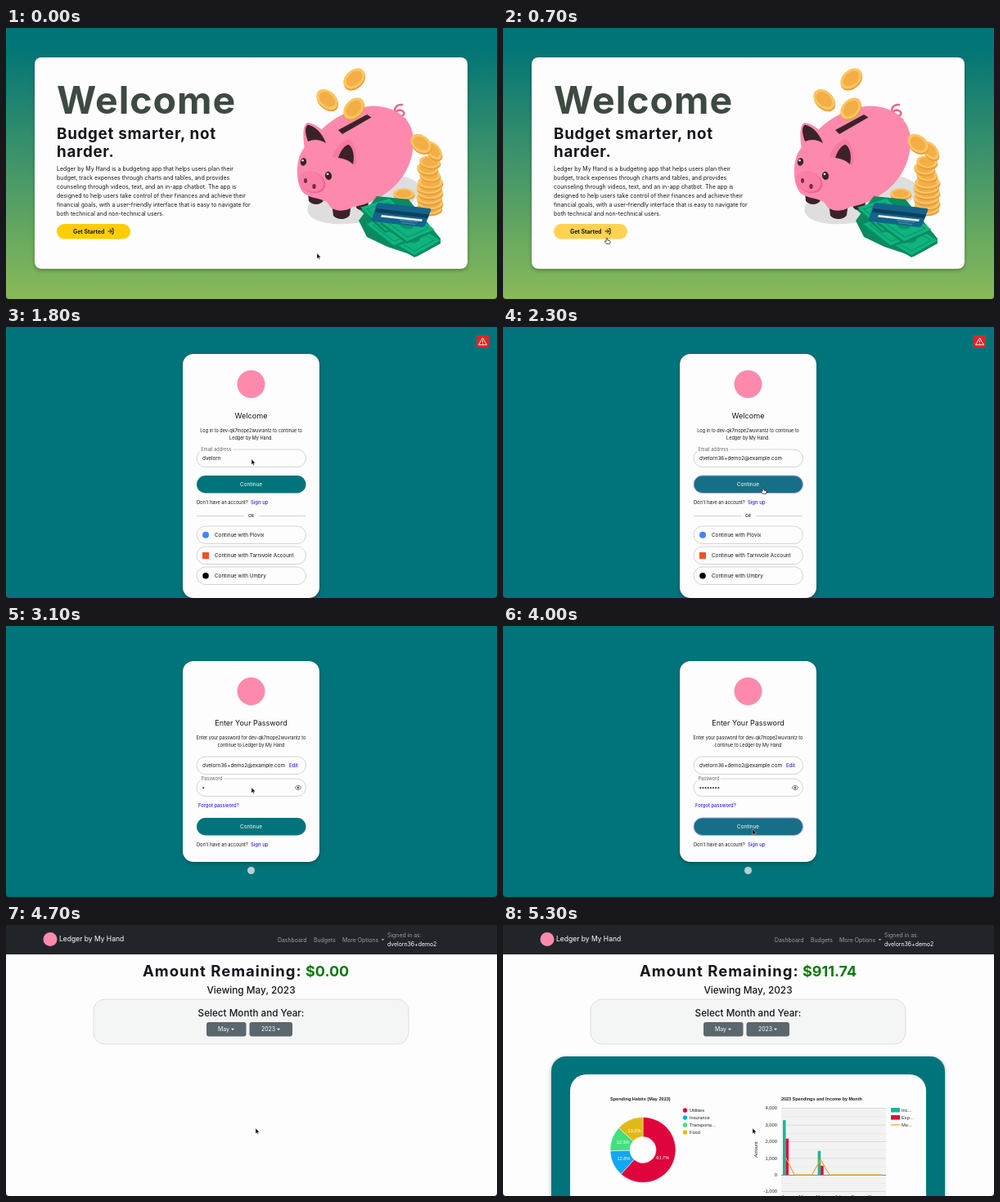
Recreate the animation shown at these times as an HTML page. Size 600 by 332 pixels, loop 5.4 s.

```html
<!DOCTYPE html>
<html lang="en">
<head>
<meta charset="utf-8">
<title>Budget app walkthrough</title>
<style>
  html, body { margin: 0; width: 100%; height: 100%; overflow: hidden; background: #1c1c1c; }
  svg { display: block; width: 100vw; height: 100vh; border-radius: 0 0 4px 4px; font-family: Inter, sans-serif; fill: #14161c; }
  .chart { font-family: "Liberation Sans", Arial, sans-serif; fill: #222; }
  .b { font-weight: 700; }
  .m { font-weight: 500; }
  .mid { text-anchor: middle; }
  .end { text-anchor: end; }
  .link { font-weight: 600; fill: #4b3af0; }
  .white { fill: #fff; }
  .grey { fill: #9b9d9e; }
  .card { fill: #fdfdfd; filter: drop-shadow(0 .6px .6px #0008) drop-shadow(0 2px 2px #0004); }
  .line { fill: none; stroke: #c9cace; stroke-width: .8; }
</style>
</head>
<body>
<svg id="stage" viewBox="0 0 600 332"></svg>
<script>
const LOOP = 5400, STEP = 100;
const APP = 'Ledger by My Hand', TENANT = 'dev-qk7mope2wuvrantz';
const USER = 'dvelorn36+demo2', EMAIL = USER + '@example.com';
const TEAL = '#00747a', PINK = '#fd8aad', DARK = '#3b2229', RED = '#e0043c', GREEN = '#1eb592';

const text = (x, y, s, size, cls = '', extra = '') =>
  `<text x="${x}" y="${y}" font-size="${size}" class="${cls}" ${extra}>${s}</text>`;
const rect = (x, y, w, h, r, fill, extra = '') =>
  `<rect x="${x}" y="${y}" width="${w}" height="${h}" rx="${r}" fill="${fill}" ${extra}/>`;
const path = (d, fill, extra = '') => `<path d="${d}" fill="${fill}" ${extra}/>`;
const ellipse = (x, y, rx, ry, fill, turn = 0) =>
  `<ellipse rx="${rx}" ry="${ry}" fill="${fill}" transform="translate(${x} ${y}) rotate(${turn})"/>`;
const circle = (x, y, r, fill) => ellipse(x, y, r, r, fill);
const group = (id, body) => `<g id="${id}">${body}</g>`;
const range = (n, f) => Array.from({ length: n }, (_, i) => f(i)).join('');

// Piggy bank illustration
const coin = (x, y, rx, ry, turn = 0) =>
  ellipse(x + .5, y + 2, rx, ry, '#e39f3c', turn) + ellipse(x, y, rx, ry, '#fbc465', turn) +
  ellipse(x, y, rx * .74, ry * .72, '#f3ae45', turn);

const bill = (x, y, turn) => `<g transform="translate(${x} ${y}) rotate(${turn})">` +
  path('M-34 3L-2-16 34 4 3 23Z', '#0a8a60') + path('M-34 0L-2-19 34 1 3 20Z', '#0fb37f') +
  path('M-26 0L-2-14 26 1 3 15Z', 'none', 'stroke="#0a9468"') + ellipse(0, 0, 9, 5.5, '#0a9468') + '</g>';

const pig =
  ellipse(437, 210, 70, 27, '#dedede', -12) +
  path('M488 112C478 114 472 104 479 101C486 99 490 107 482 108C473 108 472 93 484 94', 'none',
    'stroke="#f0648f" stroke-width="2.6" stroke-linecap="round"') +
  path('M369 202L370 212C375 218 385 217 388 211L389 202Z', DARK) +
  path('M427 210L428 220C432 225 440 224 442 219L444 208Z', DARK) +
  path('M398 214L400 230C405 236 417 235 420 229L422 214Z', DARK) +
  path('M378 134C392 113 422 97 448 95.500C480 96 498 114 498 138C498 168 482 191 462 204C449 213 434 218 424 219' +
    'C416 225 404 225 397 220L392 213C383 208 374 209 366 204C357 198 354 180 357 163C360 150 368 140 378 134Z', PINK) +
  path('M365 149C362 130 363 117 369 116C381 118 390 127 395 137Z', PINK) +
  path('M369 139C365 128 365 121 369 118.500C379 121 387 130 391 141C383 136 376 136 369 139Z', DARK) +
  path('M398 158C404 145 413 135 420 137C428 143 430 157 427 170C419 162 408 158 398 158Z', '#f77aa3') +
  path('M406 159C409 150 414 143 419 143C425 148 426 158 424 167C419 162 413 160 406 159Z', DARK) +
  path('M406 125L441 106 446.500 109.500 411 130Z', DARK) +
  ellipse(374.5, 189, 16.5, 12.5, '#ee6493', 24) + ellipse(373, 188, 15.5, 12, '#f97fa6', 24) +
  ellipse(366, 187, 2, 3, '#7c2745') + ellipse(376.5, 194, 2.2, 3.1, '#7c2745') +
  ellipse(363.5, 164, 3.6, 4.8, DARK, 10) + circle(362.5, 162.3, 1.2, '#fff') +
  ellipse(394, 181, 4, 5.2, DARK, -10) + circle(393, 179, 1.3, '#fff') +
  coin(425.5, 62, 15, 10.5, -42) + coin(392.5, 87.5, 15, 10.5, 42) + coin(425, 98.5, 15, 10.5, -48) +
  coin(486, 203, 13, 6.5) +
  range(6, i => coin(517 + i % 2 * 1.5, 221 - i * 6.4, 15.5, 7.5)) +
  range(3, i => coin(518 - i % 2 * 3, 180 - i * 8, 13, 7.5, 6)) +
  coin(522.5, 150, 13, 8, 50) + coin(507, 141.5, 14, 10, 38) +
  path('M431 236L453 206 492 210 531 258 531 264 502 280 466 268 441 256Z', '#0a8a60') +
  bill(497, 258, 2) + bill(474, 246, 10) + bill(466, 228, 14) + bill(490, 241, 8) +
  path('M455 214L518 221Q520 222 519 224L512 242Q511 244 508 244L449 237Q446 236 447 234L453 216Z', '#13648a') +
  path('M452.500 221L517 228.500 515.500 233 451 225.500Z', '#0d3f5e') +
  path('M459 229L509 234.500 508 237 458 231.500Z', '#e9f1f5') +
  path('M481 235.500L503 238M483 238.500L500 240.500', 'none', 'stroke="#5f9cc0" stroke-width=".8"');

const intro = [
  APP + ' is a budgeting app that helps users plan their',
  'budget, track expenses through charts and tables, and provides',
  'counseling through videos, text, and an in-app chatbot. The app is',
  'designed to help users take control of their finances and achieve their',
  'financial goals, with a user-friendly interface that is easy to navigate for',
  'both technical and non-technical users.'];

const home = rect(0, 0, 600, 332, 0, 'url(#sky)') + rect(35, 36, 529, 259, 8, '', 'class="card"') +
  text(62, 105, 'Welcome', 46.5, 'b', 'letter-spacing="1" style="fill:#3d4a42"') +
  text(62, 136, 'Budget smarter, not', 18.8, 'b', 'letter-spacing=".7"') +
  text(62, 158, 'harder.', 18.8, 'b', 'letter-spacing=".7"') +
  intro.map((s, i) => text(62, 174.5 + i * 11, s, 7)).join('') +
  rect(62, 240, 90, 18.5, 9.2, '#ffcd06', 'id="start"') + text(82, 251.6, 'Get Started', 6.9, 'b') +
  path('M124.500 249H129M127 246.500L129.500 249 127 251.500M129 245.800H131V252.200H129', 'none', 'stroke="#14161c"') +
  pig + group('status', rect(-2, 323, 202, 11, 2, '#1b9c85', 'stroke="#0c5a4c" stroke-width=".7"') +
    text(2, 330, 'Waiting for cache...', 5.7));

// Sign-in screens
const field = y => rect(233, y, 133.500, 21.500, 10.7, 'none', 'class="line"');
const floating = (y, s, w) => rect(237, y - 4, w, 6, 0, '#fdfdfd') + text(238.5, y, s, 5.6, '', 'style="fill:#65676e"');
const proceed = (id, y) => rect(233, y, 133.500, 21.500, 10.7, TEAL, `id="${id}"`) +
  text(299.5, y + 13.2, 'Continue', 6.3, 'mid white');
const signUp = y => text(233, y, 'Don\'t have an account?', 5.65) + text(299, y, 'Sign up', 5.9, 'link');
const provider = (y, name, mark) => field(y) + mark + text(255, y + 13.2, 'Continue with ' + name, 6.3);

const login = rect(0, 0, 600, 332, 0, TEAL) + rect(216, 33, 167, 299, 13, '', 'class="card"') +
  group('mark', circle(299.5, 70, 17, PINK)) +
  text(299.5, 111.7, 'Welcome', 9.1, 'mid') +
  text(299.5, 129, `Log in to ${TENANT} to continue to`, 5.5, 'mid') + text(299.5, 137.6, APP + '.', 5.5, 'mid') +
  field(150) + group('hint', text(242, 163.2, 'Email address', 6.3, '', 'style="fill:#6a3df0"')) +
  group('label', floating(151.8, 'Email address', 40)) + text(240, 163.2, '', 6.3, '', 'id="email"') +
  proceed('go1', 182) + signUp(216.6) +
  path('M233 231.500H291M309 231.500H366', 'none', 'class="line"') + text(299.5, 233.3, 'OR', 4.8, 'mid m') +
  provider(244, 'Plovix', circle(244, 254.8, 4, '#4285f4')) +
  provider(269, 'Tarnivole Account', rect(240, 276, 8, 8, 0, '#f25022')) +
  provider(294, 'Umbry', circle(244, 304.8, 3.8, '#000')) +
  rect(575, 10, 15, 15, 1, '#dc2626') +
  group('warning', path('M582.500 13.500L587.500 21.800H577.500ZM582.500 16.500V19M582.500 20V20.800', 'none',
    'stroke="#fff" stroke-width=".9" stroke-linejoin="round"'));

const password = rect(0, 0, 600, 332, 0, TEAL) + rect(216, 43, 167, 246, 13, '', 'class="card"') +
  circle(299.5, 80, 17, PINK) + text(299.5, 122, 'Enter Your Password', 9, 'mid') +
  text(299.5, 139, `Enter your password for ${TENANT} to`, 5.5, 'mid') +
  text(299.5, 147.6, 'continue to ' + APP, 5.5, 'mid') +
  field(160) + text(240, 173.2, EMAIL, 6.3) + text(346, 173, 'Edit', 5.9, 'link') +
  field(187.2) + floating(189, 'Password', 28.5) + group('dots', range(8, i => circle(241.2 + i * 3.15, 198.3, 1, '#1e212a'))) +
  path('M353 198Q357 192.500 361 198Q357 203.500 353 198Z', 'none', 'stroke="#65676e" stroke-width=".8"') +
  circle(357, 198, 1.5, '#65676e') +
  text(235, 222.3, 'Forgot password?', 5.75, 'link') + proceed('go2', 235) + signUp(269.6) +
  circle(299.5, 299.5, 4.5, '#b9d0d2');

// Dashboard
const caret = (x, y, fill) => path(`M${x} ${y}h4l-2 2.200Z`, fill);
const select = (x, w, s, sx, cx) => rect(x, 119, w, 17.500, 3, '#5c666d') +
  text(sx, 130.3, s, 6.9, 'white') + caret(cx, 126.800, '#fff');

const slices = [['Utilities', 61.7, RED], ['Insurance', 12.8, '#12a7f0'], ['Transporta…', 12.3, '#43e07e'], ['Food', 13.2, '#e2b914']];
function donut(x, y, r, hole) {
  let sum = 0;
  const at = (p, d) => [x + d * Math.sin(p * Math.PI / 50), y - d * Math.cos(p * Math.PI / 50)];
  return slices.map(([name, share, fill], i) => {
    const from = sum, to = sum += share, big = +(share > 50), [lx, ly] = at((from + to) / 2, 26);
    return path(`M${at(from, r)}A${r} ${r} 0 ${big} 1 ${at(to, r)}L${at(to, hole)}A${hole} ${hole} 0 ${big} 0 ${at(from, hole)}Z`,
      fill, 'stroke="#fff" stroke-width=".5"') + text(lx, ly + 2, share + '%', 5.6, 'mid white') +
      circle(222.5, 227 + i * 9, 2.7, fill) + text(228, 229 + i * 9, name, 5.6);
  }).join('');
}

const value = v => 306 - v * .0204;
const bar = (x, v, fill) => rect(x, value(v), 3.5, 306 - value(v), 0, fill);
const balance = [1030, 0, 0, 0, 911, 0, 0, 0, 0, 0, 0, 0];
const bars = rect(340, 224, 128, 108, 0, '#f2f2f2') +
  range(6, i => {
    const v = 4000 - i * 1000, y = value(v);
    return rect(340, y, 128, .6, 0, v ? '#c8c8c8' : '#444') + (i < 5 ? rect(340, y + 10.2, 128, .5, 0, '#e2e2e2') : '') +
      text(335, y + 2, v.toLocaleString('en-US'), 5.8, 'end');
  }) +
  bar(342, 3280, GREEN) + bar(345.5, 2170, RED) + bar(384.700, 1430, GREEN) + bar(388.2, 540, RED) +
  `<polyline points="${balance.map((v, i) => [345.5 + i * 10.67, value(v)]).join(' ')}" fill="none" stroke="#f5a31a" stroke-width="1.2"/>` +
  text(0, 0, 'Amount', 5.6, 'mid', 'font-style="italic" transform="translate(311 275) rotate(-90)"') +
  rect(474, 224, 11, 5.500, 0, GREEN) + rect(474, 233, 11, 5.500, 0, RED) + rect(474, 244.300, 11, 1.200, 0, '#f5a31a') +
  ['Inc…', 'Exp…', 'Mo…'].map((s, i) => text(487, 229 + i * 9.1, s, 5.7)).join('') +
  ['Jan', 'Mar', 'May', 'Jul', 'Sep', 'Nov'].map((s, i) => text(345 + i * 21.3, 334.5, s, 5.6, 'mid')).join('');

const dashboard = rect(0, 0, 600, 332, 0, '#fdfdfd') + rect(0, 0, 600, 36, 0, '#212529') +
  circle(54, 17.500, 8.5, PINK) + text(65, 20, APP, 8.5, 'white') +
  text(332, 20.5, 'Dashboard', 6.9, 'grey') + text(376, 20.5, 'Budgets', 6.9, 'grey') +
  text(411, 20.5, 'More Options', 6.9, 'grey') + caret(458.500, 17, '#9b9d9e') +
  text(466, 14.6, 'Signed in as:', 6.9, 'grey') + text(466, 25.8, USER, 6.9, 'white') +
  text(167, 63, 'Amount Remaining:', 18.5, 'b', 'letter-spacing="1"') +
  text(366, 63, '', 18, 'b', 'id="amount" style="fill:#087a08"') +
  text(299.5, 83.5, 'Viewing May, 2023', 11.8, 'mid m') +
  rect(107, 91, 385, 55, 14, '#f4f6f5', 'stroke="#d3d8d6" stroke-width=".8"') +
  text(299.5, 112, 'Select Month and Year:', 11.7, 'mid m') +
  select(245, 48.500, 'May', 259, 275) + select(297.500, 52.500, '2023', 312, 331) +
  group('panel', rect(59, 161, 481, 200, 18, TEAL, 'style="filter:drop-shadow(0 1px 2px #0005)"') + rect(82, 183, 435, 200, 20, '#fdfdfd')) +
  `<g id="charts" class="chart">${text(131, 214.5, 'Spending Habits (May 2023)', 5.55, 'b')}${donut(171, 275.5, 40, 16)}
    ${text(340, 214.5, '2023 Spendings and Income by Month', 5.45, 'b')}${bars}</g>`;

const stage = document.getElementById('stage');
stage.innerHTML = `<linearGradient id="sky" x2="0" y2="1"><stop offset=".06" stop-color="#007477"/>
  <stop offset="1" stop-color="#8aba58"/></linearGradient>` +
  group('home', home) + group('login', login) + group('password', password) + group('dashboard', dashboard) +
  group('cursor',
    group('arrow', path('M0 0V6.600L1.600 5.200 2.600 7.600 3.600 7.100 2.600 4.800H4.700Z', '#000', 'stroke="#fff" stroke-width=".4"')) +
    group('hand', path('M-1 1.200C-1-.2 .9-.2 .9 1.200V3.400L4 4.200C5 4.600 4.600 6.300 4 8.300H-.8L-3.200 5C-3 4-2 4.200-1 5Z', '#fff',
      'stroke="#111" stroke-width=".8" transform="scale(.88)"')));

const $ = id => document.getElementById(id);
const show = (id, on) => $(id).style.display = on ? '' : 'none';
const clamp = v => Math.max(0, Math.min(1, v));

// Cursor stops: time, x, y
const stops = [[0, 380, 276], [100, 380, 276], [600, 127, 257], [900, 127, 257], [1300, 313, 278], [1400, 313, 278],
  [1700, 300, 162], [2000, 300, 162], [2300, 318, 197], [2700, 318, 197], [3000, 300, 198], [3600, 300, 198],
  [3900, 305, 249], [LOOP, 305, 249]];

function cursorAt(t) {
  const i = stops.findIndex(s => s[0] > t), [t0, x0, y0] = stops[i - 1], [t1, x1, y1] = stops[i];
  const k = (t - t0) / (t1 - t0), e = k * k * (3 - 2 * k);
  return [x0 + (x1 - x0) * e, y0 + (y1 - y0) * e];
}

function hover(id, on) {
  $(id).setAttribute('fill', on ? '#176f87' : TEAL);
  $(id).setAttribute('stroke', on ? '#a9a3f5' : 'none');
}

function draw(t) {
  const within = (a, b) => t >= a && t < b;
  show('home', t < 1300 || within(4200, 4700));
  show('login', within(1300, 2700));
  show('password', within(2700, 4200));
  show('dashboard', t >= 4700);
  show('status', t >= 4200);
  $('start').setAttribute('fill', within(600, 1000) ? '#ffd252' : '#ffcd06');

  show('mark', t >= 1500);
  show('warning', t >= 1400);
  show('hint', t < 1700);
  show('label', t >= 1700);
  $('email').textContent = EMAIL.slice(0, Math.round(EMAIL.length * clamp((t - 1700) / 400)));
  hover('go1', t >= 2200);

  const typed = Math.round(8 * clamp((t - 3000) / 600));
  [...$('dots').children].forEach((dot, i) => dot.style.display = i < typed ? '' : 'none');
  hover('go2', t >= 3800);

  $('amount').textContent = t < 4900 ? '$0.00' : '$911.74';
  show('panel', t >= 4900);
  show('charts', t >= 5000);

  const hand = within(600, 1000) || within(1300, 1500) || within(2200, 2800);
  show('hand', hand);
  show('arrow', !hand);
  $('cursor').setAttribute('transform', `translate(${cursorAt(t)})`);
}

function frame() {
  draw(Math.floor(performance.now() % LOOP / STEP) * STEP);
  requestAnimationFrame(frame);
}
frame();
</script>
</body>
</html>
```
